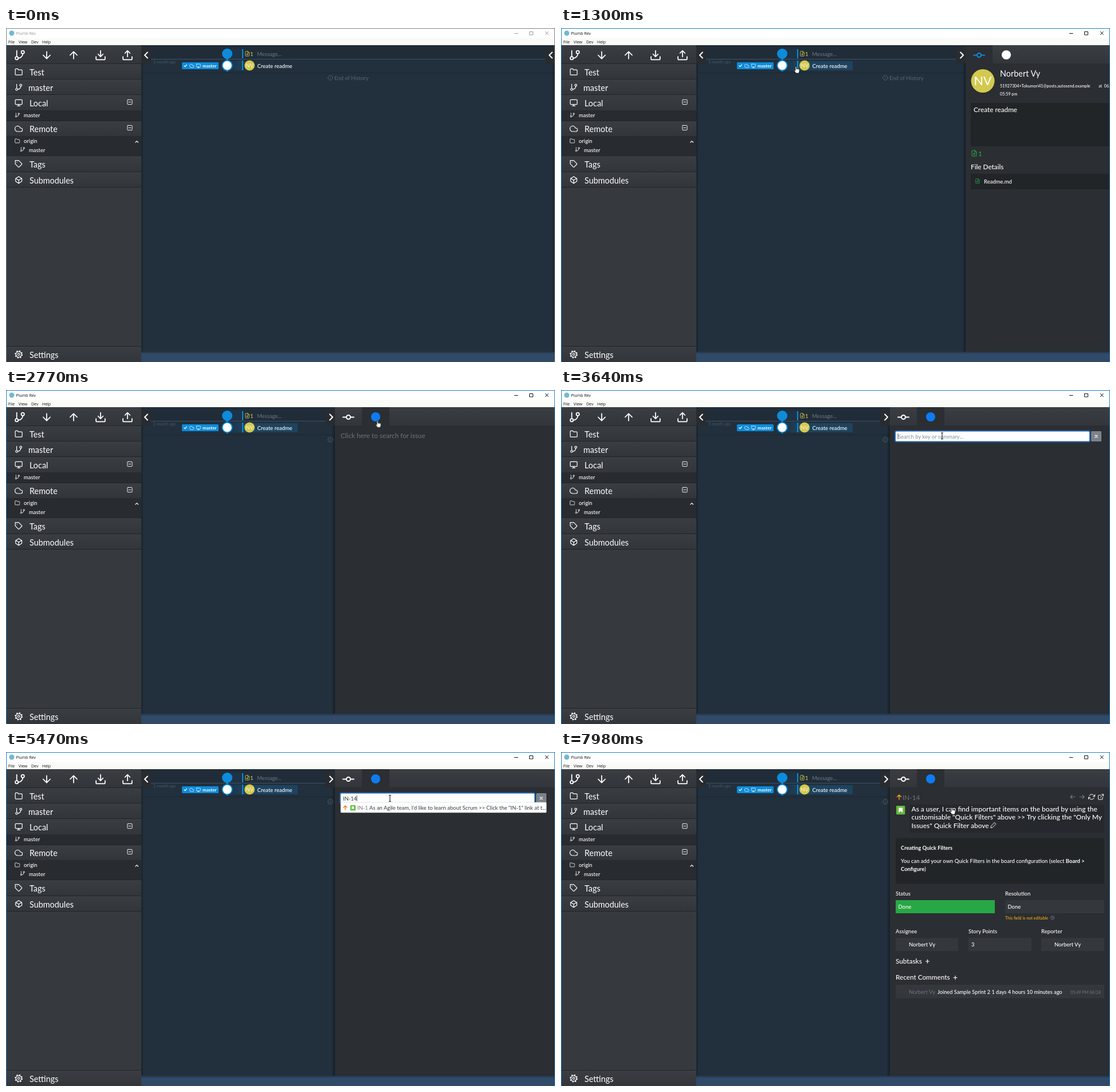
An HTML page for the animation above (8 s loop, 958 by 584 pixels).

```html
<!DOCTYPE html>
<html lang="en">
<head>
<meta charset="utf-8">
<title>Commit viewer</title>
<style>
html, body { margin: 0; width: 100%; height: 100%; overflow: hidden; background: #22303d; }
svg { display: block; }
#stage { width: 100vw; height: 100vh; }
text { font: 500 9.45px Lato, sans-serif; fill: #fff; white-space: pre; }
.h1 { font-size: 14.4px; font-weight: 400; }
.h2 { font-size: 11.75px; }
.sm { font-size: 7.2px; }
.mid { text-anchor: middle; }
.bold { font-weight: 700; }
.summary text { font-size: 11.95px; }
.os text { font: 7px "Open Sans", sans-serif; fill: #111; }
.dim, .ink .dim { fill: #70757a; font-weight: 400; }
.ink text { fill: #343a40; font-weight: 400; }
.ic { fill: none; stroke: #fff; stroke-width: 2; stroke-linecap: round; stroke-linejoin: round; }
.line { stroke: #212428; }
#panel { animation: slide 8s infinite; }
#cursor { animation: roam 8s linear infinite; }
#spinner { animation: spin 1s linear infinite; transform-origin: 766px 313px; }
@keyframes slide {
  0%, 14.83% { transform: translateX(384px); }
  18.58%, 100% { transform: none; }
}
@keyframes roam {
  0%, 2.74% { transform: translate(764px, 465px); }
  5.5% { transform: translate(620px, 270px); }
  9% { transform: translate(450px, 95px); }
  12.1%, 17.5% { transform: translate(410px, 67px); }
  23.4% { transform: translate(575px, 75px); }
  27.4%, 34.5% { transform: translate(648px, 44px); }
  34.6% { transform: translate(648px, 53px); }
  36.9%, 43% { transform: translate(657px, 79px); }
  47.1%, 71.2% { transform: translate(670px, 81px); }
  80%, 99.7% { transform: translate(677.5px, 96px); }
  99.75%, 100% { transform: translate(682px, 97px); }
}
@keyframes spin {
  from { transform: rotate(-165.6deg); }
  to { transform: rotate(194.4deg); }
}
</style>
</head>
<body>
<svg id="stage" viewBox="0 0 958 584">
<defs>
  <linearGradient id="bar" x2="0" y2="1"><stop stop-color="#3a3e43"/><stop offset="1" stop-color="#32363b"/></linearGradient>
  <linearGradient id="band"><stop stop-color="#1d3347"/><stop offset="1" stop-color="#1c4059"/></linearGradient>
  <linearGradient id="shade"><stop stop-color="#000" stop-opacity="0"/><stop offset="1" stop-color="#000" stop-opacity=".35"/></linearGradient>
  <linearGradient id="drop" x2="0" y2="1"><stop stop-color="#000" stop-opacity=".3"/><stop offset="1" stop-color="#000" stop-opacity="0"/></linearGradient>
  <symbol id="branch" viewBox="0 0 24 24"><path d="M6 3v12M18 9a9 9 0 0 1-9 9"/><circle cx="18" cy="6" r="3"/><circle cx="6" cy="18" r="3"/></symbol>
  <symbol id="down" viewBox="0 0 24 24"><path d="M12 5v14M5 12l7 7 7-7"/></symbol>
  <symbol id="up" viewBox="0 0 24 24"><path d="M12 19V5M5 12l7-7 7 7"/></symbol>
  <symbol id="download" viewBox="0 0 24 24"><path d="M3 15v4a2 2 0 0 0 2 2h14a2 2 0 0 0 2-2v-4M7 10l5 5 5-5M12 15V3"/></symbol>
  <symbol id="upload" viewBox="0 0 24 24"><path d="M3 15v4a2 2 0 0 0 2 2h14a2 2 0 0 0 2-2v-4M7 8l5-5 5 5M12 3v12"/></symbol>
  <symbol id="folder" viewBox="0 0 24 24"><path d="M22 19a2 2 0 0 1-2 2H4a2 2 0 0 1-2-2V5a2 2 0 0 1 2-2h5l2 3h9a2 2 0 0 1 2 2z"/></symbol>
  <symbol id="monitor" viewBox="0 0 24 24"><rect x="2" y="3" width="20" height="14" rx="2"/><path d="M8 21h8M12 17v4"/></symbol>
  <symbol id="cloud" viewBox="0 0 24 24"><path d="M18 10h-1.3A8 8 0 1 0 9 20h9a5 5 0 0 0 0-10z"/></symbol>
  <symbol id="tag" viewBox="0 0 24 24"><path d="M20.6 13.4l-7.2 7.2a2 2 0 0 1-2.8 0L2 12V2h10l8.6 8.6a2 2 0 0 1 0 2.8zM7 7h.01"/></symbol>
  <symbol id="box" viewBox="0 0 24 24"><path d="M21 8v8l-9 6-9-6V8l9-6zM3 7.5l9 5 9-5M12 22V12"/></symbol>
  <symbol id="gear" viewBox="0 0 24 24"><circle cx="12" cy="12" r="3"/><circle cx="12" cy="12" r="8"/><circle cx="12" cy="12" r="10" stroke-width="3" stroke-linecap="butt" pathLength="16" stroke-dasharray="1"/></symbol>
  <symbol id="minus" viewBox="0 0 24 24"><rect x="3" y="3" width="18" height="18" rx="2"/><path d="M8 12h8"/></symbol>
  <symbol id="file" viewBox="0 0 24 24"><path d="M14 2H6a2 2 0 0 0-2 2v16a2 2 0 0 0 2 2h12a2 2 0 0 0 2-2V8zM14 2v6h6M12 11v7M8.5 14.5h7"/></symbol>
  <symbol id="info" viewBox="0 0 24 24"><circle cx="12" cy="12" r="10"/><path d="M12 16v-4M12 8h.01"/></symbol>
  <symbol id="refresh" viewBox="0 0 24 24"><path d="M23 4v6h-6M1 20v-6h6M3.5 9a9 9 0 0 1 15-3.4L23 10M1 14l4.6 4.4A9 9 0 0 0 20.5 15"/></symbol>
  <symbol id="open" viewBox="0 0 24 24"><path d="M18 13v6a2 2 0 0 1-2 2H5a2 2 0 0 1-2-2V8a2 2 0 0 1 2-2h6M15 3h6v6M10 14L21 3"/></symbol>
  <symbol id="pencil" viewBox="0 0 24 24"><path d="M16 3l5 5L8 21l-6 1 1-6z"/></symbol>
  <symbol id="story" viewBox="0 0 16 16"><rect width="16" height="16" rx="1.5" fill="#63ba3c"/><path d="M4.5 3.5h7v9L8 9.5l-3.5 3z" fill="#fff"/></symbol>
  <path id="arrow" d="M0 0v10l2.3-2.2 1.5 3.5 1.5-.7-1.5-3.3H7z"/>
  <path id="hand" d="M-1 .8q1-1.6 2 0v4q1-1 1.700 0 1-.8 1.700.2 1.300-.6 1.600.6v3L5 12H0L-3 7.600q0-1.400 1-1L-1 7.600z"/>
  <path id="beam" d="M-2-5.500h1.300L0-5l.7-.5H2M0-5V5M-2 5.500h1.300L0 5l.7.5H2"/>
</defs>

<!-- History -->
<rect y="30" width="958" height="554" fill="#22303d"/>
<rect x="236" y="30" width="722" height="25" fill="#202d39"/>
<rect x="236" y="54" width="722" height="1" fill="#405060"/>
<rect x="236" y="77" width="722" height="4" fill="url(#drop)" opacity=".5"/>
<rect x="236" y="566" width="722" height="18" fill="#304a67"/>
<rect x="236" y="566" width="722" height="4" fill="url(#drop)"/>
<rect x="386" y="36" width="26" height="18" fill="#1d3347"/>
<rect x="386" y="57" width="26" height="17" fill="url(#band)"/>
<rect x="414" y="58" width="95" height="16" fill="#1d435f" data-show="900 8000"/>
<path d="M386 45V76" stroke="#0d8cdb" stroke-width="3"/>
<circle cx="386" cy="45" r="9" fill="#0d8cdb"/>
<circle cx="386" cy="65.500" r="8.600" fill="#fff" stroke="#0d8cdb" stroke-width="1.800"/>
<path d="M413 37v16M413 57v17" stroke="#0d8cdb" stroke-width="2"/>
<text x="257" y="62" style="font-size:7.1px;fill:#465460">1 month ago</text>
<rect x="307" y="60" width="64" height="12" rx="1.500" fill="#0d8cdb"/>
<path class="ic" d="M311 66l1.500 1.700 3-3.500" style="stroke-width:1.200"/>
<g class="ic"><use href="#cloud" x="320" y="62" width="8.500" height="8.500"/><use href="#monitor" x="331.500" y="62" width="8.500" height="8.500"/></g>
<text x="343" y="69" class="bold" style="font-size:8px">master</text>
<use href="#file" class="ic" style="stroke:#d3c94f" x="416" y="40" width="10" height="10"/>
<text x="426" y="49" style="fill:#d3c94f">1</text>
<text x="438" y="48.500" style="fill:#6b7681;font-weight:400">Message...</text>
<circle cx="425" cy="65.500" r="9" fill="#d3c94f"/>
<text x="425" y="69" class="mid" style="fill:#f3f0cd">NV</text>
<text x="438.500" y="69.500">Create readme</text>
<use href="#info" class="ic" style="stroke:#5a6772" x="561" y="82" width="10" height="10"/>
<text x="573" y="90.500" style="fill:#5a6772;font-weight:400">End of History</text>

<!-- Sidebar -->
<rect y="30" width="236" height="554" fill="#363a3f"/>
<rect x="236" y="30" width="3" height="536" fill="#1b2731"/>
<g fill="url(#bar)">
  <rect y="30" width="236" height="32"/><rect y="62" width="236" height="27"/><rect y="89" width="236" height="27"/>
  <rect y="116" width="236" height="28"/><rect y="162" width="236" height="27"/><rect y="223" width="236" height="28"/>
  <rect y="251" width="236" height="27"/><rect y="557" width="236" height="27"/>
</g>
<path d="M0 144h236v18H0zM0 189h236v34H0z" fill="#282b2f"/>
<path class="line" d="M0 62.500h236M0 89.500h236M0 116.500h236M0 162.500h236M0 223.500h236M0 251.500h236M0 278.500h236M0 556.500h236"/>
<g class="ic">
  <use href="#branch" x="13.500" y="37" width="21" height="21"/>
  <use href="#down" x="60.500" y="37" width="21" height="21"/>
  <use href="#up" x="107.500" y="37" width="21" height="21"/>
  <use href="#download" x="154.500" y="37" width="21" height="21"/>
  <use href="#upload" x="201.500" y="37" width="21" height="21"/>
  <use href="#folder" x="15" y="69.500" width="14.400" height="14.400"/>
  <use href="#branch" x="15" y="96.500" width="14.400" height="14.400"/>
  <use href="#monitor" x="15" y="123.500" width="14.400" height="14.400"/>
  <use href="#cloud" x="15" y="169" width="14.400" height="14.400"/>
  <use href="#tag" x="15" y="230.500" width="14.400" height="14.400"/>
  <use href="#box" x="15" y="258.500" width="14.400" height="14.400"/>
  <use href="#gear" x="15" y="563.500" width="14.400" height="14.400"/>
  <use href="#minus" x="210.500" y="124" width="11" height="11"/>
  <use href="#minus" x="210.500" y="169" width="11" height="11"/>
  <use href="#branch" x="15" y="147.500" width="9.600" height="9.600"/>
  <use href="#folder" x="15" y="192.500" width="9.600" height="9.600"/>
  <use href="#branch" x="24" y="207.500" width="9.600" height="9.600"/>
  <path d="M226 200l2.300-2.300 2.300 2.300" stroke-width="1.200"/>
</g>
<text x="41" y="82.500" class="h1">Test</text>
<text x="39" y="109.500" class="h1">master</text>
<text x="41" y="136.500" class="h1">Local</text>
<text x="31" y="156">master</text>
<text x="41" y="182" class="h1">Remote</text>
<text x="31" y="201">origin</text>
<text x="40" y="216.500">master</text>
<text x="41" y="244" class="h1">Tags</text>
<text x="41" y="271.500" class="h1">Submodules</text>
<text x="41" y="576.500" class="h1">Settings</text>
<path d="M236 33h14q3 0 3 3v23q0 3-3 3h-14z" fill="#282b2f"/>
<path class="ic" d="M247 42.500l-5 5 5 5"/>

<!-- Side panel -->
<g id="panel">
  <rect x="568" y="62" width="6" height="504" fill="url(#shade)"/>
  <path d="M574 33h-14q-3 0-3 3v23q0 3 3 3h14z" fill="#282b2f"/>
  <path class="ic" d="M569 42.500l-5 5 5 5" data-show="0 1170"/>
  <path class="ic" d="M565 42.500l5 5-5 5" data-show="1170 8000"/>
  <rect x="574" y="30" width="384" height="535.500" fill="#2b2e32"/>

  <g data-show="0 2190">
    <rect x="621" y="30" width="337" height="32" fill="url(#bar)"/>
    <g class="ic" style="stroke:#0d8cdb"><circle cx="597.500" cy="47.500" r="3.500"/><path d="M588 47.500h6M601 47.500h6"/></g>
    <circle cx="645" cy="47" r="8" fill="#fff"/>
    <circle cx="604" cy="92.500" r="20.500" fill="#d3c94f"/>
    <text x="604" y="100" class="mid" style="font-size:21.500px;font-weight:400">NV</text>
    <text x="634" y="85" class="h1">Norbert Vy</text>
    <text x="634" y="103.500" class="sm">51927304+Tokumori41@posts.autosend.example</text>
    <text x="806" y="103.500" class="sm">at  06/24/2018</text>
    <text x="634" y="117.500" class="sm">05:59 pm</text>
    <rect x="583" y="131" width="365" height="76" fill="#222528"/>
    <path class="line" d="M583 154.500h365"/>
    <text x="588" y="147" class="h2">Create readme</text>
    <use href="#file" class="ic" style="stroke:#28a745" x="583" y="213" width="12" height="12"/>
    <text x="596" y="223.500" class="h2" style="fill:#28a745">1</text>
    <text x="583" y="247" class="h2">File Details</text>
    <rect x="583" y="255" width="365" height="27" fill="#222528"/>
    <use href="#file" class="ic" style="stroke:#28a745" x="590" y="263" width="9.600" height="9.600"/>
    <text x="606" y="272">Readme.md</text>
  </g>

  <g data-show="2190 8000">
    <rect x="574" y="30" width="47" height="32" fill="url(#bar)"/>
    <rect x="669" y="30" width="289" height="32" fill="url(#bar)"/>
    <g class="ic"><circle cx="597.500" cy="47.500" r="3.500"/><path d="M588 47.500h6M601 47.500h6"/></g>
    <circle cx="645" cy="47" r="8" fill="#0d7cf2"/>
    <text x="584" y="83.500" class="h2 dim" data-show="2190 3130">Click here to search for issue</text>

    <g class="ink" data-show="3130 6250">
      <rect x="583" y="71.500" width="340" height="19" rx="2.500" fill="none" stroke="#1d65b3" stroke-width="2" data-show="3450 6250"/>
      <rect x="584" y="72.500" width="338" height="17" rx="1.500" fill="#fff"/>
      <rect x="925" y="72" width="18" height="18" rx="1.500" fill="#7b8289"/>
      <path class="ic" d="M932 79l4 4M936 79l-4 4" style="stroke-width:1.200"/>
      <text x="588" y="84.500" style="fill:#868c92" data-show="3130 4580">Search by key or summary...</text>
      <g id="typing" stroke="#343a40" stroke-width=".8"></g>
    </g>
    <g class="ink" data-show="5380 6250">
      <rect x="584" y="88" width="359" height="18" rx="1.500" fill="#fff" stroke="#c3c6c9" stroke-width=".5"/>
      <path class="ic" d="M592 101v-7M589 97l3-3 3 3" style="stroke:#f0791f;stroke-width:1.400"/>
      <use href="#story" x="600.500" y="93" width="9.500" height="9.500"/>
      <g data-show="5380 5520">
        <text x="613" y="100.500" class="dim">IN-1</text>
        <text x="634" y="100.500">As an Agile team, I'd like to learn about Scrum >> Click the "IN-1" link at t...</text>
      </g>
      <g data-show="5520 6250">
        <text x="613" y="100.500" class="dim">IN-14</text>
        <text x="640" y="100.500">As a user, I can find important items on the board by using the custo...</text>
      </g>
    </g>

    <g data-show="6250 6850">
      <text x="584" y="83.500" class="h2 dim">IN-14</text>
      <rect x="574" y="62" width="384" height="503.500" fill="#000" opacity=".22"/>
      <path id="spinner" d="M774.750 297.800A17.500 17.500 0 0 1 782.600 318.400" fill="none" stroke="#0d7cf2" stroke-width="2" data-show="6460 6850"/>
    </g>

    <g data-show="6850 8000">
      <path class="ic" d="M590 83v-8M586.500 78.500l3.500-3.500 3.500 3.500" style="stroke:#f0a51f;stroke-width:1.500"/>
      <text x="596" y="83.500" class="h2 dim">IN-14</text>
      <path class="ic" d="M897 78.500h-8l3-3m-3 3l3 3M905 78.500h8l-3-3m3 3l-3 3" style="stroke:#73787d;stroke-width:1.200"/>
      <g class="ic"><use href="#refresh" x="920" y="72.500" width="12" height="12"/><use href="#open" x="936" y="72.500" width="12" height="12"/></g>
      <use href="#story" x="585" y="94" width="15.500" height="15.500"/>
      <rect x="608" y="92" width="340" height="49" fill="#25282c"/>
      <g class="summary">
        <text x="611.500" y="104">As a user, I can find important items on the board by using the</text>
        <text x="611.500" y="118">customisable "Quick Filters" above >> Try clicking the "Only My</text>
        <text x="611.500" y="132.500">Issues" Quick Filter above</text>
      </g>
      <use href="#pencil" class="ic" x="749" y="122" width="11.500" height="11.500" data-show="7610 8000"/>
      <rect x="584" y="150.500" width="364" height="80" fill="#222528"/>
      <text x="593" y="171" class="bold" style="font-size:9.300px">Creating Quick Filters</text>
      <text x="593" y="194">You can add your own Quick Filters in the board configuration (select <tspan class="bold">Board ></tspan></text>
      <text x="593" y="208"><tspan class="bold">Configure</tspan>)</text>
      <text x="584" y="250.500">Status</text><text x="775" y="250.500">Resolution</text>
      <rect x="584" y="259" width="173" height="23" fill="#28a745"/>
      <g fill="#34383d">
        <rect x="775" y="259" width="173" height="23"/>
        <rect x="584" y="325" width="109" height="23"/><rect x="711" y="325" width="110" height="23"/><rect x="838" y="325" width="110" height="23"/>
        <rect x="584" y="407" width="364" height="23.500"/>
      </g>
      <text x="588.500" y="274">Done</text><text x="779.500" y="274">Done</text>
      <text x="775" y="292.500" class="sm" style="fill:#f5ac12">This field is not editable</text>
      <g class="ic" style="stroke:#767b80;stroke-width:.8"><circle cx="857.500" cy="290" r="3"/><path d="M856.500 289q1-1.600 2 0l-1 1.200v.8"/></g>
      <text x="584" y="316.500">Assignee</text><text x="711" y="316.500">Story Points</text><text x="838" y="316.500">Reporter</text>
      <text x="607" y="340">Norbert Vy</text><text x="716" y="340">3</text><text x="861" y="340">Norbert Vy</text>
      <text x="584" y="369.500" class="h2">Subtasks</text><text x="584" y="398" class="h2">Recent Comments</text>
      <path class="ic" d="M636.500 366h6M639.500 363v6M685 394.500h6M688 391.500v6" style="stroke-width:1.200"/>
      <text x="607" y="422.500" class="dim">Norbert Vy</text>
      <text x="657" y="422.500" style="font-size:9.200px">Joined Sample Sprint 2 1 days 4 hours 10 minutes ago</text>
      <text x="889" y="422.500" class="sm dim">05:49 PM 04/24</text>
    </g>
  </g>
</g>

<!-- Window frame -->
<rect width="958" height="30" fill="#fff"/>
<rect y="18" width="958" height="12" fill="#fafaf7"/>
<circle cx="10" cy="9" r="4.500" fill="#72b7d3"/>
<g class="os">
  <text x="17.500" y="11.500" style="fill:#999" data-show="0 1090">Plumb Rev</text>
  <text x="17.500" y="11.500" data-show="1090 8000">Plumb Rev</text>
  <text x="4" y="26.500">File</text><text x="22" y="26.500">View</text><text x="44" y="26.500">Dev</text><text x="63" y="26.500">Help</text>
</g>
<g fill="none" stroke="#999" data-show="0 1090"><use href="#controls"/><path d="M0 .500h958M.500 0v584M957.500 0v584" stroke="#74818c"/></g>
<g fill="none" stroke="#111" data-show="1090 8000"><path id="controls" d="M887 9.500h6.500M913.500 6.500h6v5.500h-6zM941 6l5.500 6M946.500 6l-5.500 6"/><path d="M0 .500h958M.500 0v584M957.500 0v584" stroke="#1b7fca"/></g>

<g id="cursor">
  <g fill="#fff" stroke="#000" stroke-width=".7" stroke-linejoin="round">
    <use href="#arrow" data-show="220 900"/>
    <use href="#hand" data-show="900 1450"/>
    <use href="#arrow" data-show="1450 2190"/>
    <use href="#hand" data-show="2190 3200"/>
    <use href="#arrow" data-show="5800 7980"/>
    <use href="#hand" data-show="7980 8000"/>
  </g>
  <g fill="none" data-show="3200 5800">
    <use href="#beam" stroke="#e8e8e8" stroke-width="2"/>
    <use href="#beam" stroke="#111"/>
  </g>
</g>
</svg>
<script>
const LOOP = 8000;

// [start, end, text, caret x]
const typing = [
  [3450, 4150, '', 588],
  [4580, 4710, 'I', 591],
  [4710, 4940, 'IN', 598],
  [4940, 5070, 'IN-', 602],
  [5070, 5250, 'IN-1', 607],
  [5250, 6250, 'IN-14', 612.3],
];
document.getElementById('typing').innerHTML = typing.map(([from, to, text, x]) =>
  `<g data-show="${from} ${to}"><text x="588" y="84.5" stroke="none">${text}</text><path d="M${x} 76v10"/></g>`).join('');

for (const el of document.querySelectorAll('[data-show]')) {
  const [from, to] = el.dataset.show.split(' ').map(Number);
  const key = (time, opacity) => ({ offset: time / LOOP, opacity, easing: 'step-end' });
  const last = to === LOOP ? 1 : 0;
  el.animate([key(0, from ? 0 : 1), key(from, 1), key(to, last), key(LOOP, last)],
    { duration: LOOP, iterations: Infinity });
}
</script>
</body>
</html>
```
